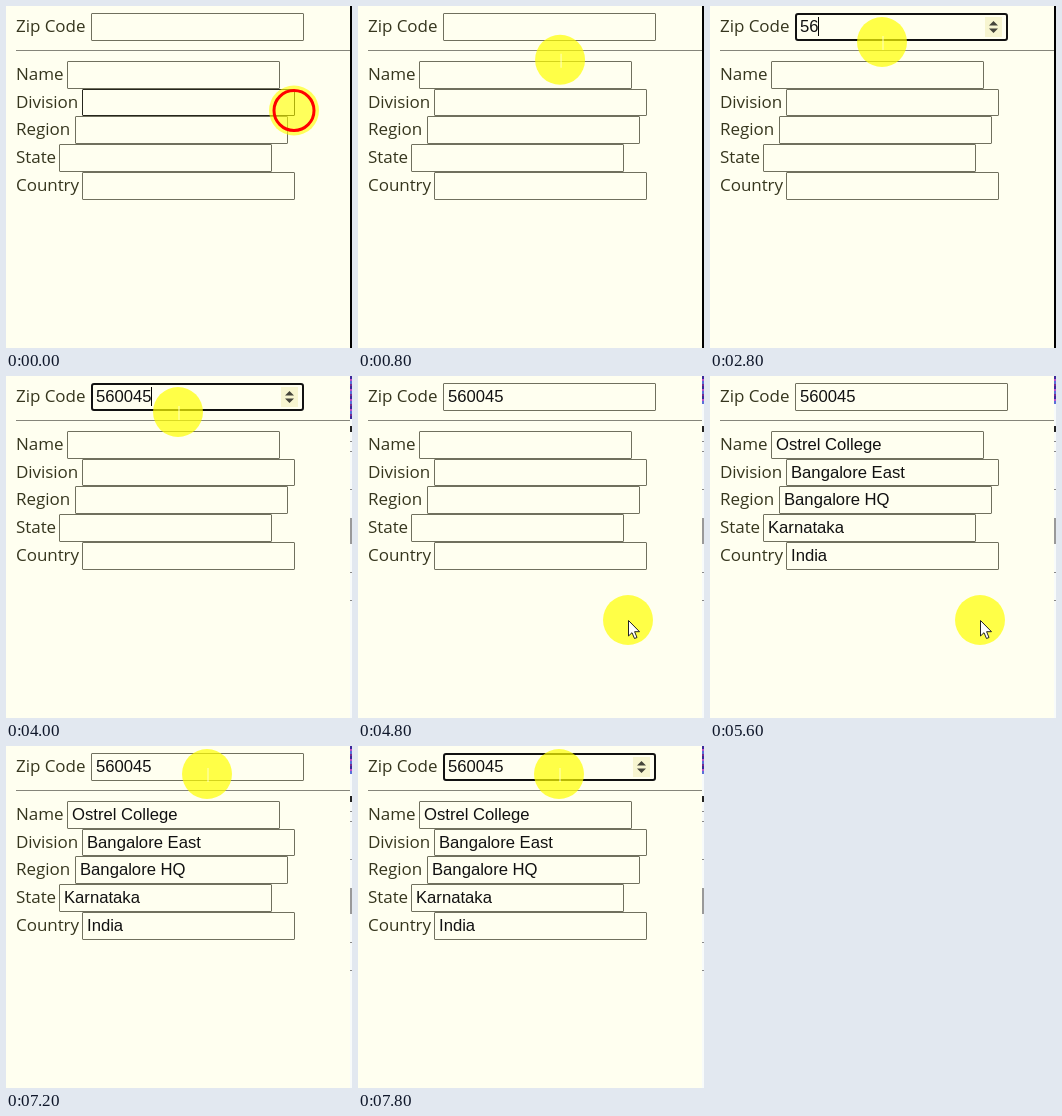
Animation of 346x342 px, one loop 8000 ms. Source, as an HTML page:

```html
<!DOCTYPE html>
<html lang="en">
<head>
<meta charset="utf-8">
<title>Zip code lookup</title>
<style>
  html, body { margin: 0; width: 100%; height: 100%; overflow: hidden; background: #fffff0; }
  #stage { position: relative; width: 346px; height: 342px; overflow: hidden; background: #fffff0; }
  #stage div, #stage svg { position: absolute; box-sizing: border-box; }
  .label { left: 10px; font: 17px/25px "Open Sans", "Noto Sans", sans-serif; letter-spacing: -.05px; color: #36361e; white-space: nowrap; }
  .field { width: 213px; height: 27.7px; padding-left: 4px; border: 1px solid #70705e; border-radius: 1px; font: 16.67px/26px "Liberation Sans", Arial, sans-serif; color: #111; white-space: pre; }
  .field.hover { border-color: #26261c; }
  .field.focus { border: 2px solid #111; border-radius: 3px; padding-left: 3px; line-height: 24px; }
  .caret { display: inline-block; width: 1px; height: 19px; margin-left: -1px; background: #000; vertical-align: -4px; }
  #rule { left: 10px; top: 44px; width: 336px; height: 1px; background: #85857a; }
  #spinner { left: 275px; top: 11px; }
  #edge { left: 344px; top: 0; width: 2px; height: 342px; }
  #edge.black { background: #000; }
  #edge.marks { background: linear-gradient(#fff0 45px, #555 0 48px, #fff0 0 70px, #5a78c8 0 80px, #fff0 0 102px, #7080b0 0 104px, #fff0 0 118px, #7080b0 0 120px, #fff0 0 134px, #7080b0 0 136px, #fff0 0 295px, #000 0), #eef6ff; }
  #edge.busy, #edge.calm { --top: 43px; background:
    linear-gradient(#fff0 50px, #222 0 56px, #fff0 0 65px, #888 0 66px, #fff0 0 75px, #888 0 76px, #fff0 0 113px, #888 0 114px, #fff0 0 142px, #999 0 168px, #fff0 0 196px, #888 0 197px, #fff0 0 224px, #888 0 225px, #fff0 0),
    repeating-linear-gradient(#3a2a9a 0 3px, #c050c8 0 5px, #5a70d8 0 8px, #7a2a90 0 10px) 0 0 / 2px var(--top) no-repeat, #f8fbfa; }
  #edge.calm { --top: 28px; }
  #pointer { left: 0; top: 0; width: 52px; height: 52px; overflow: visible; }
  #glow { fill: #ff0; }
  #ring { fill: none; stroke: #f00; stroke-width: 3; }
</style>
</head>
<body>
<div id="stage">
  <div id="rule"></div>
  <svg id="spinner" width="17" height="20">
    <rect width="17" height="20" fill="#f7f5d0"/>
    <path d="M4 8.5L8.5 4L13 8.5ZM4 11.5L8.5 16L13 11.5Z" fill="#45453a"/>
  </svg>
  <div id="edge"></div>
  <svg id="pointer">
    <circle id="glow" r="25"/>
    <circle id="ring" r="20"/>
    <path id="beam" d="M1 -6V8" stroke="#ffffc0"/>
    <path id="arrow" d="M.5 .5V16L4 12.7L6.5 18.5L9 17.5L6.6 11.7H11.5Z" fill="#fff" stroke="#222"/>
  </svg>
</div>
<script>
  const LOOP = 8000, STEP = 200;
  const FIRST_ROW = 54.9, ROW_PITCH = 27.75;
  const $ = id => document.getElementById(id);
  const stage = $("stage");

  // label, field left, looked-up value
  const rows = [
    ["Name", 61, "Ostrel College"],
    ["Division", 76, "Bangalore East"],
    ["Region", 69, "Bangalore HQ"],
    ["State", 53, "Karnataka"],
    ["Country", 76, "India"]
  ];

  function addBox(className, left, top, text) {
    const box = document.createElement("div");
    box.className = className;
    box.style.left = left + "px";
    box.style.top = top + "px";
    box.textContent = text;
    stage.insertBefore(box, $("spinner"));
    return box;
  }

  function addRow(label, left, top) {
    addBox("label", 10, top, label);
    return addBox("field", left, top, "");
  }

  const zip = addRow("Zip Code", 85, 7);
  const fields = rows.map(([label, left], i) => addRow(label, left, FIRST_ROW + i * ROW_PITCH));
  const zipText = document.createElement("span");
  const caret = document.createElement("span");
  caret.className = "caret";
  zip.append(zipText, caret);

  // time, x, y
  const path = [
    [0, 288, 104.5], [400, 288, 104.5], [1000, 172, 36], [4200, 172, 36],
    [4600, 270, 244], [6000, 270, 244], [6600, 252, 134], [7200, 201, 28], [LOOP, 201, 28]
  ];
  const keyTimes = [2400, 2600, 3000, 3200, 3400, 3600];
  const edges = [[0, "black"], [1400, "marks"], [2000, "black"], [3400, "busy"], [4400, "calm"]];

  const within = (t, from, to) => t >= from && t < to;

  function pointerAt(t) {
    const i = path.findIndex(p => p[0] > t);
    const [t0, x0, y0] = path[i - 1], [t1, x1, y1] = path[i];
    const k = (t - t0) / (t1 - t0), ease = k * k * (3 - 2 * k);
    return [x0 + (x1 - x0) * ease, y0 + (y1 - y0) * ease];
  }

  const show = (element, on) => { element.style.visibility = on ? "visible" : "hidden"; };

  function draw() {
    const t = Math.floor(performance.now() % LOOP / STEP) * STEP;
    const [x, y] = pointerAt(t);
    const pressed = t < 200 || within(t, 1000, 1200) || t === 4600 || t === 7400;
    const focused = within(t, 1200, 4600) || t >= 7400;
    const typing = within(t, 2400, 4200);
    const typed = keyTimes.filter(k => k <= t).length;

    $("pointer").style.transform = `translate(${x}px, ${y}px)`;
    $("glow").style.opacity = pressed ? .62 : .7;
    show($("ring"), pressed);
    show($("arrow"), !pressed && y > 196);
    show($("beam"), !pressed && y <= 196);

    zip.classList.toggle("focus", focused);
    show($("spinner"), focused);
    zipText.textContent = "560045".slice(0, typed);
    show(caret, focused && (typing || (t - 1200) % 1000 < 500));
    fields[1].classList.toggle("hover", t < 400);
    fields.forEach((field, i) => { field.textContent = t >= 5400 ? rows[i][2] : ""; });

    $("edge").className = edges.filter(e => e[0] <= t).pop()[1];
    requestAnimationFrame(draw);
  }
  draw();
</script>
</body>
</html>
```
